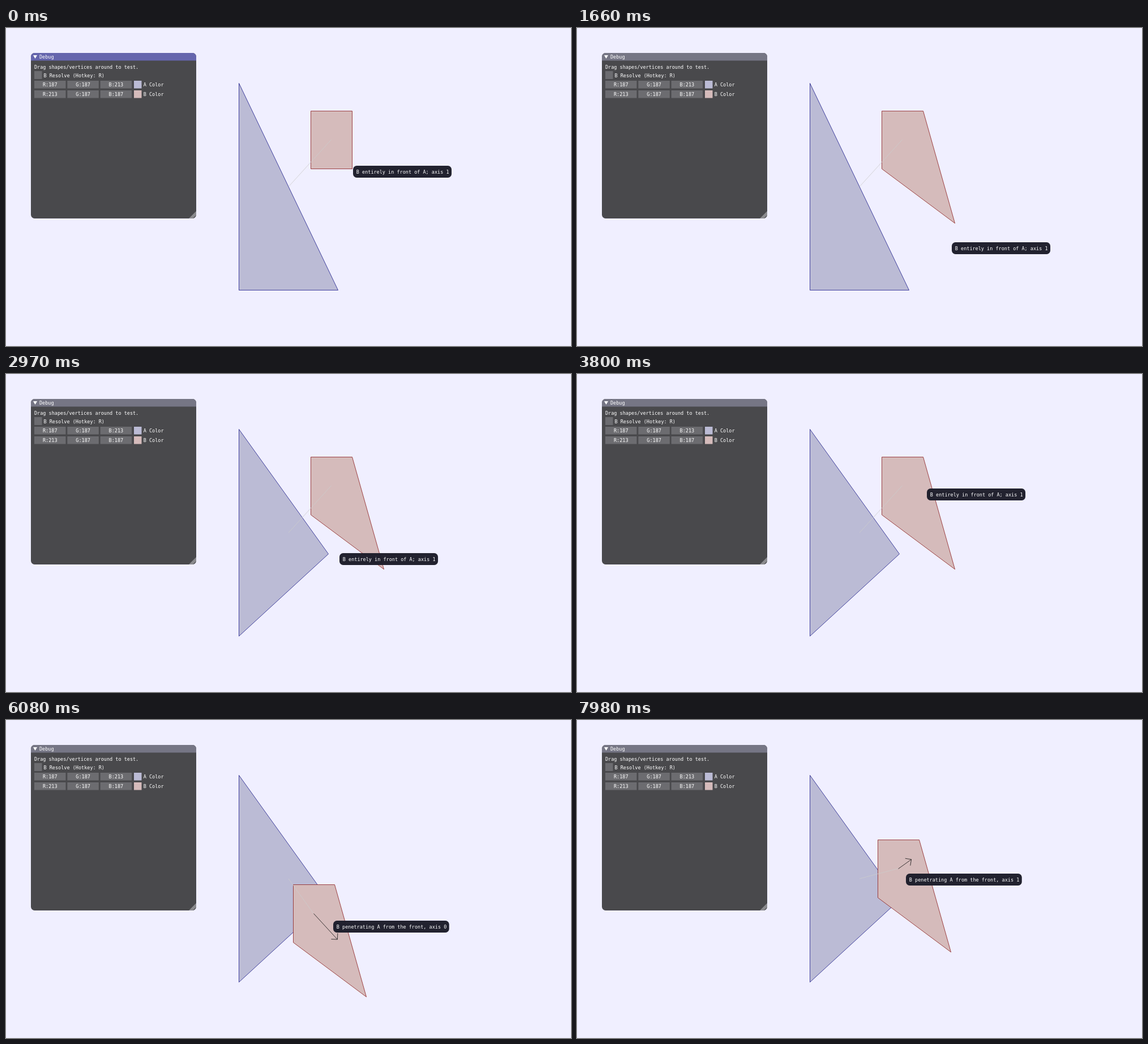
Write an HTML page with a canvas that moves like this. It is 998 px wide and 561 px high and loops after 8000 ms.

```html
<!DOCTYPE html>
<html lang="en">
<head>
<meta charset="utf-8">
<title>Shape collision test</title>
<style>
  html, body { margin: 0; width: 100%; height: 100%; overflow: hidden; background: #f0efff; }
  canvas { display: block; }
</style>
</head>
<body>
<canvas id="stage" width="998" height="561"></canvas>
<script>
const ctx = document.getElementById('stage').getContext('2d');
const LOOP = 8000, STEP = 56.5;
const BACKGROUND = '#f0efff', A_FILL = '#bbbbd5', B_FILL = '#d5bbbb';

// The tooltip corner follows the mouse. Each move runs along a Bezier curve
// from where the last one ended, through its bend to its final point.
const home = [613, 243];
const moves = [
  { start: 50, end: 420, to: [627.5, 251] },
  { start: 830, end: 1320, bend: [653.5, 325.4], to: [683.5, 346.5] },
  { start: 1550, end: 2110, to: [606, 461] },
  { start: 2460, end: 2970, bend: [600, 366], to: [588.6, 316.2] },
  { start: 3270, end: 3800, bend: [528, 245], to: [618, 202] },
  { start: 3920, end: 4080, to: [609.5, 210] },
  { start: 4370, end: 5130, bend: [561, 252], to: [585, 337.5] },
  { start: 5180, end: 5840, bend: [628, 358], to: [566, 358] },
  { start: 6020, end: 6310, bend: [588, 353.3], to: [586, 342.5] },
  { start: 7250, end: 7420, bend: [603, 323], to: [619, 338.5] },
  { start: 7770, end: 7980, bend: [584, 300], to: [581, 271] }
];

const add = (p, q) => [p[0] + q[0], p[1] + q[1]];
const dot = (p, q) => p[0] * q[0] + p[1] * q[1];
const mix = (p, q, k) => p.map((v, i) => v + (q[i] - v) * k);

function mouse(t) {
  let position = home;
  for (const { start, end, bend, to } of moves) {
    if (t < start) break;
    const steps = Math.round((end - start) / STEP);
    const step = Math.min(steps, Math.floor(steps * (t - start) / (end - start) + 0.1));
    const k = (step + 1) / (steps + 1);
    position = bend ? mix(mix(position, bend, k), mix(bend, to, k), k) : mix(position, to, k);
  }
  return position;
}

// How far something held from one time to another has been moved by time t.
function drag(t, from, to) {
  const a = mouse(from), b = mouse(Math.max(from, Math.min(to, t)));
  return [b[0] - a[0], b[1] - a[1]];
}

// Separating axis test of B against the edges of A.
function contact(A, B) {
  let best = { depth: Infinity };
  for (let i = 0; i < A.length; i++) {
    const p = A[i], q = A[(i + 1) % A.length];
    const length = Math.hypot(q[0] - p[0], q[1] - p[1]);
    const n = [(p[1] - q[1]) / length, (q[0] - p[0]) / length];
    const a = A.map(v => dot(v, n)), b = B.map(v => dot(v, n));
    const front = Math.max(...a) - Math.min(...b);
    const back = Math.max(...b) - Math.min(...a);
    if (front <= 0) return { text: `B entirely in front of A; axis ${i}` };
    if (back <= 0) return { text: `B entirely behind A; axis ${i}` };
    const depth = Math.min(front, back);
    if (depth < best.depth) {
      const side = front < back ? 'front' : 'back', s = front < back ? depth : -depth;
      best = { depth, push: [n[0] * s, n[1] * s], text: `B penetrating A from the ${side}, axis ${i}` };
    }
  }
  return best;
}

function polyline(points, stroke, fill) {
  ctx.beginPath();
  points.forEach(p => ctx.lineTo(...p));
  if (fill) {
    ctx.closePath();
    ctx.fillStyle = fill;
    ctx.fill();
  }
  if (stroke) {
    ctx.strokeStyle = stroke;
    ctx.stroke();
  }
}

function box(x, y, w, h, color, radius = 0) {
  ctx.fillStyle = color;
  ctx.beginPath();
  ctx.roundRect(x, y, w, h, radius);
  ctx.fill();
}

function label(text, x, y, align = 'left') {
  ctx.fillStyle = '#fff';
  ctx.textAlign = align;
  ctx.fillText(text, x, y);
}

function arrow(from, push) {
  const tip = add(from, push), angle = Math.atan2(push[1], push[0]);
  const barb = turn => [tip[0] - 11 * Math.cos(angle + turn), tip[1] - 11 * Math.sin(angle + turn)];
  polyline([from, tip], '#111');
  polyline([barb(Math.PI / 4), tip, barb(-Math.PI / 4)], '#111');
}

function tooltip(text, position) {
  const [x, y] = position.map(Math.round);
  box(x, y, ctx.measureText(text).width + 10.3, 21, 'rgba(30,30,43,0.98)', 6.5);
  label(text, x + 5.8, y + 14);
}

function colorRow(y, name, rgb) {
  rgb.forEach((value, i) => {
    const x = 50 + i * 58.3;
    box(x, y, 55.5, 13.5, '#6c6c70');
    label('RGB'[i] + ':' + value, x + 27.8, y + 10, 'center');
  });
  box(226, y, 13.5, 13.5, `rgb(${rgb})`);
  label(name + ' Color', 242.7, y + 10);
}

function panel(active) {
  box(44, 44, 292, 292, '#49494c', 6.5);
  box(44, 44, 292, 13.5, active ? '#6565ad' : '#767685', [6.5, 6.5, 0, 0]);
  polyline([[48, 48], [55, 48], [51.5, 54]], null, '#fff');
  polyline([[336, 323], [336, 330], [330, 336], [323, 336]], null, '#8b8b8e');
  label('Debug', 59, 54);
  label('Drag shapes/vertices around to test.', 50, 72);
  box(50, 76, 13.5, 14, '#6c6c70');
  label('B Resolve (Hotkey: R)', 66.5, 86.5);
  colorRow(93, 'A', [187, 187, 213]);
  colorRow(110, 'B', [213, 187, 187]);
}

function draw(t) {
  const resolve = t >= 6600 ? [54.2, 0] : [0, 0];
  const body = [drag(t, 4080, 6310), resolve, drag(t, 7420, LOOP)].reduce(add, [538, 146]);
  const corner = add([73, 102], drag(t, 420, 1320));
  const A = [[411, 462], add([586, 462], drag(t, 2110, 2970)), [411, 97]];
  const B = [[0, 0], [73, 0], corner, [0, 102]].map(p => add(body, p));
  const center = add(body, [36.5, 51]);
  const hit = contact(A, B);
  const pixel = p => p.map(v => Math.round(v) + 0.5);

  ctx.fillStyle = BACKGROUND;
  ctx.fillRect(0, 0, 998, 561);
  ctx.lineWidth = 0.8;
  ctx.font = '8.5px "DejaVu Sans Mono", monospace';
  polyline(A.map(pixel), '#1e1e8c', A_FILL);
  polyline(B.map(pixel), '#8c1e1e', B_FILL);
  polyline([[499, 280], center], '#cccccc');
  if (hit.push) arrow(pixel(center), hit.push);
  panel(t < 600);
  tooltip(hit.text, mouse(t));
}

function frame() {
  draw(performance.now() % LOOP);
  requestAnimationFrame(frame);
}
frame();
</script>
</body>
</html>
```
